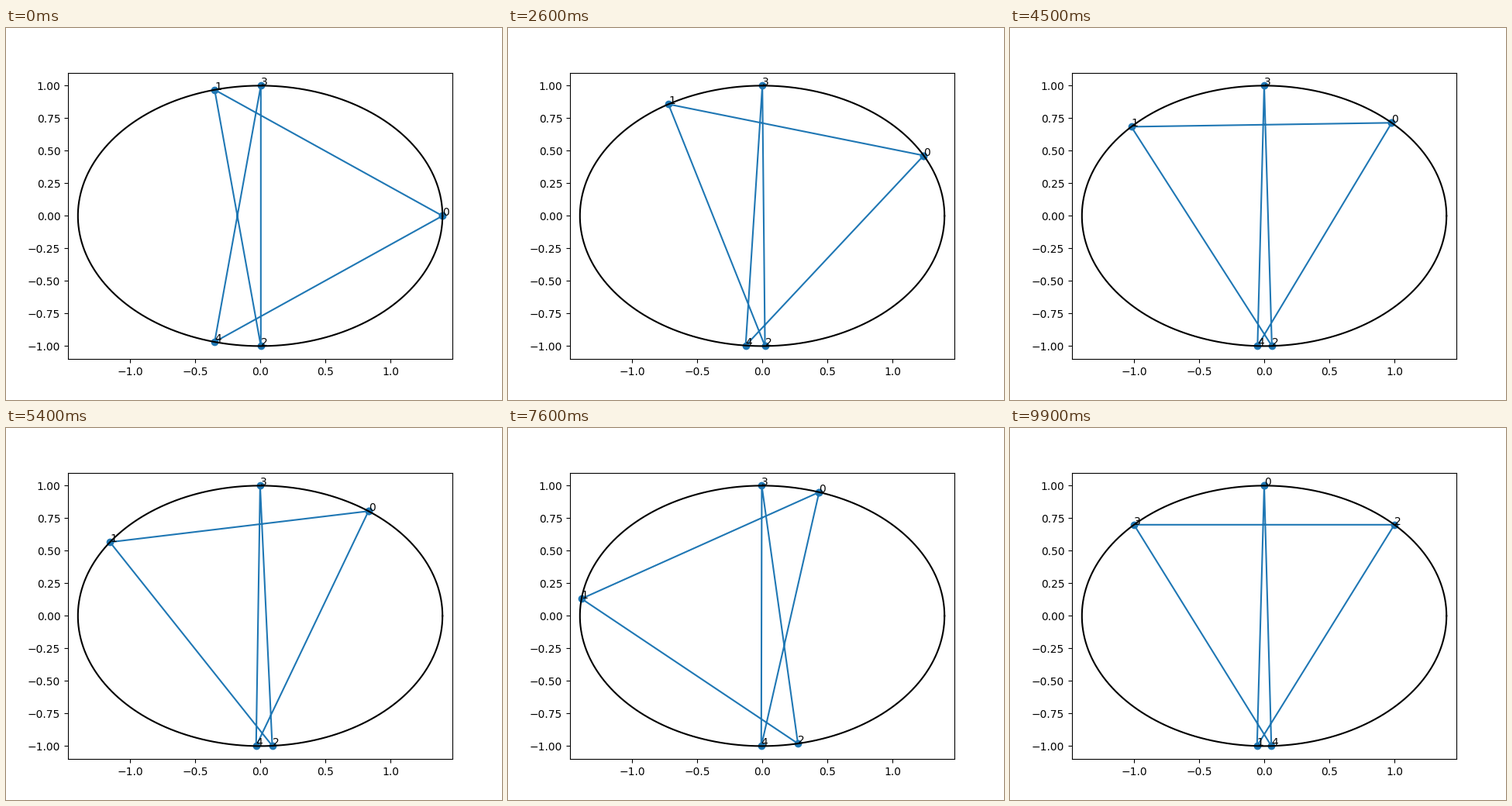
Recreate the animation shown at these times as a matplotlib script. Size 640 px wide and 480 px high, loop 10000 ms.

```python
import numpy as np
import matplotlib.pyplot as plt
from matplotlib.animation import FuncAnimation

A, B = 1.4, 1.0          # semi-axes
SIDES, TURNS = 5, 2      # pentagram
FRAMES, INTERVAL = 100, 100


def point(t):
    return A * np.cos(t), B * np.sin(t)


def bisect(too_small, lo, hi, steps=52):
    """Vectorised bisection for a quantity that grows with its argument."""
    for _ in range(steps):
        mid = (lo + hi) / 2
        low = too_small(mid)
        lo, hi = np.where(low, mid, lo), np.where(low, hi, mid)
    return (lo + hi) / 2


def chord(t, d):
    """Length of the chord from angle t to angle t + d."""
    m = t + d / 2
    return 2 * np.sin(d / 2) * np.hypot(A * np.sin(m), B * np.cos(m))


def step(t, side):
    """Next vertex counter-clockwise at distance side."""
    zero = np.zeros_like(t)
    return t + bisect(lambda d: chord(t, d) < side, zero, zero + np.pi)


def walk(t, side):
    path = [t]
    for _ in range(SIDES):
        path.append(step(path[-1], side))
    return np.array(path)


def quarter_arc(n):
    """Angles of n points evenly spaced by arc length over a quarter turn."""
    t = np.linspace(0, np.pi / 2, 20001)
    mid = (t[1:] + t[:-1]) / 2
    speed = np.hypot(A * np.sin(mid), B * np.cos(mid))
    s = np.concatenate([[0], np.cumsum(speed)])
    return np.interp(np.linspace(0, s[-1], n), s, t)


# Equilateral closed star through each starting vertex
start = quarter_arc(FRAMES)
goal = start + 2 * np.pi * TURNS
side = bisect(lambda s: walk(start, s)[-1] < goal,
              np.full(FRAMES, 1.5 * B), np.full(FRAMES, 2.0 * B))
angles = walk(start, side)[:SIDES]

fig, ax = plt.subplots(figsize=(6.4, 4.8), dpi=100)
ax.set_xlim(-A * 0 - 496 / 336, 496 / 336)
ax.set_ylim(-1.1 * B, 1.1 * B)

star, = ax.plot([], [], "o-", color="C0")
ax.plot(*point(np.linspace(0, 2 * np.pi, 200)), color="black")
labels = [ax.text(0, 0, str(i)) for i in range(SIDES)]


def update(frame):
    x, y = point(angles[:, frame])
    star.set_data(np.append(x, x[0]), np.append(y, y[0]))
    for label, px, py in zip(labels, x, y):
        label.set_position((px, py))
    return [star, *labels]


anim = FuncAnimation(fig, update, frames=FRAMES, interval=INTERVAL,
                     repeat=True, repeat_delay=0)
plt.show()
```
